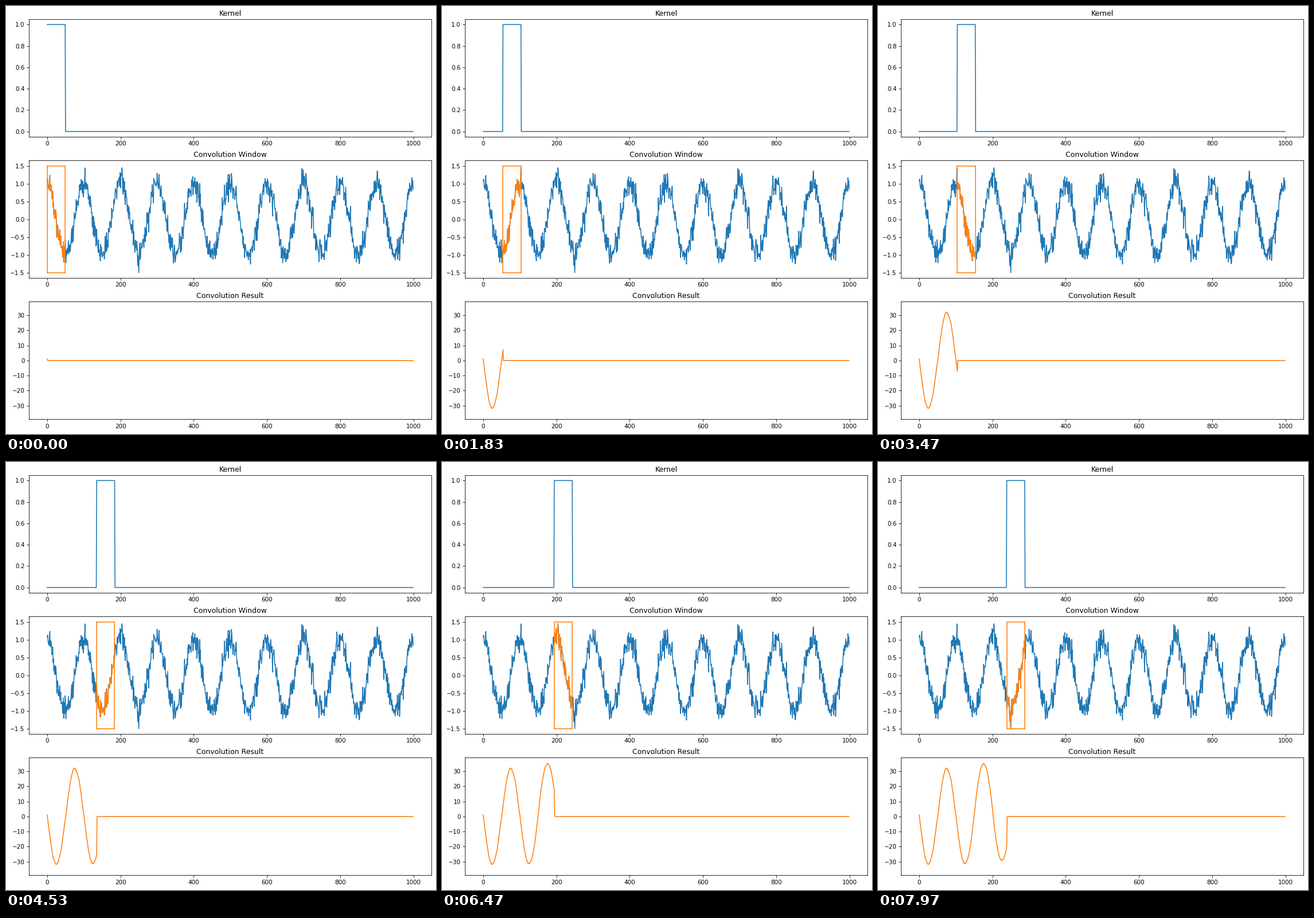
Recreate the animation shown at these times as a matplotlib script. Size 750x746 px, loop 8 s.

```python
import numpy as np
import matplotlib.pyplot as plt
from matplotlib.animation import FuncAnimation

W, H, DPI = 750, 746, 75
LEFT, RIGHT = 40, 742
TOP, PITCH, HEIGHT = 23, 246.2, 205
N, WIDTH, PERIOD = 1000, 50, 100
FRAMES, LOOP = 240, 8000
BLUE, ORANGE = "tab:blue", "tab:orange"


def make_signal(x):
    """Noisy cosine; the noise is balanced locally and drifts up once."""
    noise = np.random.default_rng(7).normal(0, 0.19, (N // 25, 25))
    noise -= noise.mean(axis=1, keepdims=True)
    drift = 0.08 * np.exp(-((x - 220) / 50) ** 2)
    signal = np.cos(2 * np.pi * x / PERIOD) + noise.ravel() + drift
    return np.clip(signal, -1.5, 1.5)


x = np.arange(N)
signal = make_signal(x)
sums = np.convolve(signal, np.ones(WIDTH), "valid")

# The small margin keeps the pixel size from rounding down
fig = plt.figure(figsize=((W + 0.001) / DPI, (H + 0.001) / DPI), dpi=DPI,
                 facecolor="white")


def panel(row, title, ylim, yticks):
    bottom = TOP + row * PITCH + HEIGHT
    ax = fig.add_axes([LEFT / W, 1 - bottom / H,
                       (RIGHT - LEFT) / W, HEIGHT / H])
    ax.set_title(title)
    ax.set_xlim(-49.95, 1048.95)
    ax.set_ylim(*ylim)
    ax.set_xticks(range(0, 1001, 200))
    ax.set_yticks(yticks)
    return ax


kernel_ax = panel(0, "Kernel", (-0.05, 1.05), np.linspace(0, 1, 6))
window_ax = panel(1, "Convolution Window", (-1.65, 1.65),
                  np.linspace(-1.5, 1.5, 7))
result_ax = panel(2, "Convolution Result", (-39.1, 39.1), range(-30, 31, 10))

kernel_line, = kernel_ax.plot(x, np.zeros(N), color=BLUE)
window_ax.plot(x, signal, color=BLUE)
part_line, = window_ax.plot([], [], color=ORANGE)
sides = [window_ax.plot([], [], color=ORANGE)[0] for _ in range(4)]
result_line, = result_ax.plot(x, np.zeros(N), color=ORANGE)


def update(k):
    a, b = k, k + WIDTH - 1
    kernel_line.set_ydata(np.where((x >= a) & (x <= b), 1.0, 0.0))
    part_line.set_data(x[a:b + 1], signal[a:b + 1])
    edges = [((a, a), (-1.5, 1.5)), ((b, b), (-1.5, 1.5)),
             ((a, b), (1.5, 1.5)), ((a, b), (-1.5, -1.5))]
    for line, (xs, ys) in zip(sides, edges):
        line.set_data(xs, ys)
    result = np.zeros(N)
    result[:k + 1] = sums[:k + 1]
    result_line.set_ydata(result)
    return [kernel_line, part_line, *sides, result_line]


anim = FuncAnimation(fig, update, frames=FRAMES, interval=LOOP / FRAMES,
                     init_func=lambda: update(0), repeat=True, repeat_delay=0)
plt.show()
```
